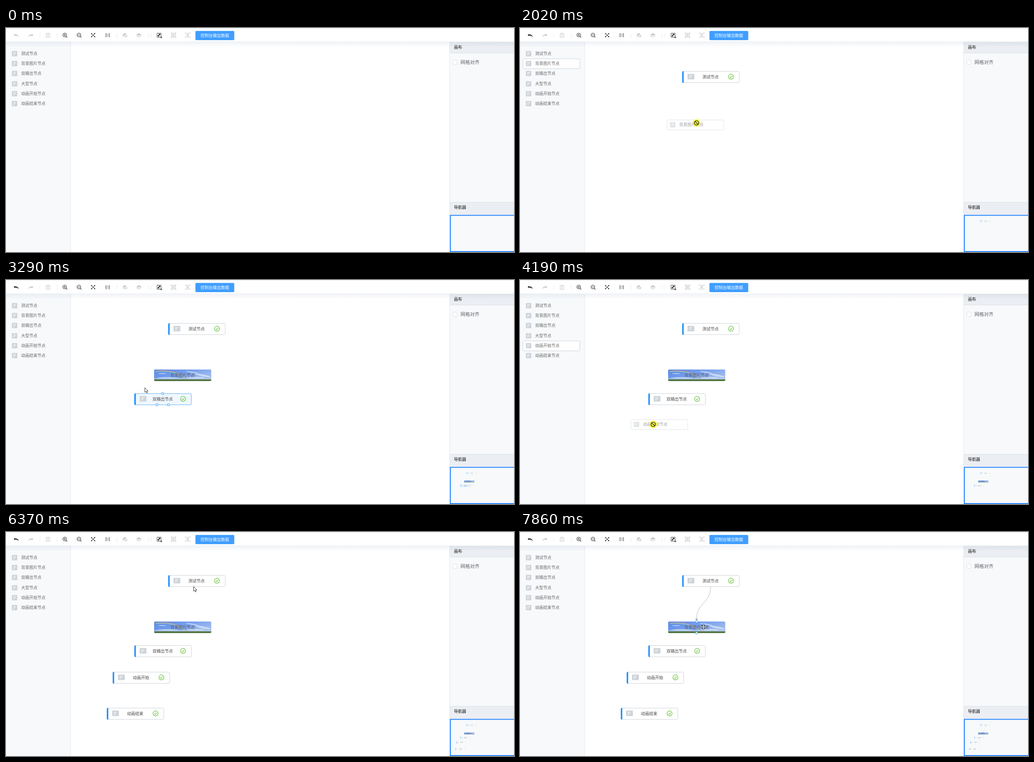
Write an HTML page that moves like this. It is 1125x498 px and loops after 8 s.

```html
<!DOCTYPE html>
<html lang="zh">
<head>
<meta charset="utf-8">
<title>流程图编辑器</title>
<style>
  html, body { margin: 0; width: 100%; height: 100%; overflow: hidden; background: #fff; }
  svg { display: block; }
  text { font-family: "Noto Sans CJK SC", "Noto Sans CJK", "Noto Sans", sans-serif; font-size: 9px; }
  .mid { text-anchor: middle; }
  .line { fill: none; stroke: currentColor; }
  .solid { fill: currentColor; }
  .dark { color: #222; }
  .dim { color: #c6c6c6; }
  .body { fill: #fff; stroke: #ced4d9; }
  .hot .body { fill: #f0f7ff; stroke: #69b4fb; }
  .port { fill: #fff; stroke: #1890ff; display: none; }
  .halo { fill: #1890ff; opacity: .25; display: none; }
  .hot .port, .linking .halo, .linking .in { display: inline; }
  .item .box { fill: none; stroke: none; }
  .item.hot .box { fill: #fff; stroke: #ced4d9; }
</style>
</head>
<body>
<svg id="stage" width="1125" height="498" viewBox="0 0 1125 498">
  <defs>
    <linearGradient id="shade" x2="0" y2="1">
      <stop stop-color="#00346b" stop-opacity=".055"/><stop offset="1" stop-color="#00346b" stop-opacity="0"/>
    </linearGradient>
    <linearGradient id="sky" x2="1" y2=".6">
      <stop stop-color="#5a8ae4"/><stop offset=".5" stop-color="#759fee"/><stop offset="1" stop-color="#a3bdec"/>
    </linearGradient>
    <clipPath id="card"><rect width="126.5" height="25.5" rx="2.5"/></clipPath>
  </defs>
  <g id="panels"></g>
  <g id="tools"></g>
  <g id="items"></g>
  <g id="graph"><path id="edge" fill="none" stroke="#b4bac2"/><path id="tip" d="M388 192.500h6l-3 6z" fill="#a9b0b9"/></g>
  <use href="#graph" transform="translate(954.7 409.7) scale(.182 .18)"/>
  <g id="ghost" opacity=".62"></g>
  <g id="cursor">
    <circle id="press" r="8.500" fill="#ff0" opacity=".7"/>
    <path id="arrow" d="M.5 0v10.200l2.400-2.200 1.700 3.700 1.600-.7-1.700-3.600h3.200z" fill="#fff" stroke="#222" stroke-width=".9"/>
    <g id="ban" fill="none" stroke="#222" stroke-width="1.400"><circle r="4.900"/><path d="M-3.500-3.500 3.500 3.500"/></g>
    <path id="cross" d="M-6 0H6M0-6V6" stroke="#222"/>
    <path id="move" d="M0-6.500 2.700-3.700H1.100V-1.100H3.700V-2.700L6.500 0 3.700 2.700V1.100H1.100V3.700H2.700L0 6.500-2.700 3.700H-1.100V1.100H-3.700V2.700L-6.500 0-3.700-2.700V-1.100H-1.100V-3.700H-2.700z" fill="#fff" stroke="#222" stroke-width=".9"/>
  </g>
</svg>
<script>
const $ = id => document.getElementById(id);
const rect = (x, y, w, h, fill, more = '') =>
  `<rect x="${x}" y="${y}" width="${w}" height="${h}" fill="${fill}" ${more}/>`;
// y is the middle of the line
const label = (x, y, s, fill, more = '', size = 9) =>
  `<text x="${x}" y="${y + size * .37}" fill="${fill}" ${more} style="font-size:${size}px">${s}</text>`;
const add = (id, html) => $(id).insertAdjacentHTML('beforeend', html);

// Panels
add('panels', [
  rect(0, 0, 1125, 1, '#ececec'),
  rect(0, 31, 143, 467, '#f7f9fb'), rect(142.5, 31, 1, 467, '#e4e8ec'),
  rect(982, 31, 143, 467, '#f7f9fb'), rect(982, 31, 1, 467, '#e4e8ec'),
  rect(983, 31, 142, 25, '#ebeef2'), rect(983, 55, 142, 1, '#dce3e8'),
  rect(983, 387, 142, 28, '#ebeef2'), rect(983, 387, 142, 1, '#dce3e8'),
  rect(0, 30, 1125, 1, '#eceff2'), rect(0, 31, 1125, 12, 'url(#shade)'),
  label(992, 42.5, '画布', '#111'), label(992, 398.5, '导航器', '#111'),
  rect(989.5, 71.5, 9.5, 9.5, '#fff', 'stroke="#dcdfe6" rx="1"'),
  label(1006.5, 76, '网格对齐', '#606266', '', 10.5),
  rect(984, 416.5, 143, 80.5, '#f7f9fb', 'stroke="#1a80ff" stroke-width="1.900"')
].join(''));

// Toolbar
const tool = (x, cls, html, id = '') =>
  add('tools', `<g class="${cls}" ${id && `id="${id}"`} transform="translate(${x} 16)">${html}</g>`);
const line = (d, w = 1) => `<path class="line" d="${d}" stroke-width="${w}"/>`;
const solid = d => `<path class="solid" d="${d}"/>`;
const bend = 'M-5.500-.4-2.300-3v1.600C2.300-1.700 5 .2 5.500 4 3.600 1.600 1.500.6-2.300.7v1.600z';
const lens = line('M3.500-.5A4 4 0 1 1-4.500-.5A4 4 0 1 1 3.500-.5M2.300 2.300 5 5', 1.1);
const frame = line('M-4.500-4.500H4.500V4.500H-4.500z', .8);
const corners = solid('M-6-5.500h2v2h-2zM4-5.500h2v2h-2zM-6 3.500h2v2h-2zM4 3.500h2v2h-2z');
const bars = solid('M-3-2.500h6v1.800h-6zM-3 .7h6v1.800h-6z');
const sheets = line('M-5 0 0 2 5 0M-5 2.300 0 4.300 5 2.300', .9);

tool(22.500, 'dim', solid(bend), 'undo');
tool(55, 'dim', `<g transform="scale(-1 1)">${solid(bend)}</g>`);
tool(93, 'dim', line('M-5-3H5M-1.700-3V-4.700H1.700V-3M-4-3V5H4V-3M-1.300-.5V3M1.300-.5V3', .9));
tool(130.500, 'dark', lens + line('M-2.500-.5h4M-.5-2.500v4'));
tool(162, 'dark', lens + line('M-2.500-.5h4'));
tool(193, 'dark', line('M-4.500-4.500-2-2M4.500-4.500 2-2M4.500 4.500 2 2M-4.500 4.500-2 2', 1.1) +
  solid('M-1.300-1.300h2.600v2.600h-2.600zM-4.500-2h2.500v-2.500zM4.500-2h-2.500v-2.500zM4.500 2h-2.500v2.500zM-4.500 2h2.500v2.500z'));
tool(225, 'dark', line('M-3.500-4.500v9M3.500-4.500v9') + solid('M-.6-2.500h1.200v1.400H-.6zM-.6 1.100h1.200v1.400H-.6z'));
tool(263, 'dim', solid('M-5-1.500 0-4.500 4-2.500-1 .5z') + sheets + solid('M2 1h4L4 4z'));
tool(294, 'dim', solid('M-5-1.500 0-4.500 4-2.500-1 .5z') + sheets + solid('M2 0h4L4-3z'));
tool(339, 'dark', frame + solid('M-3 0h3.500v2.500H-3zM-1-3h4v2.500h-4z') + line('M2 4.500h5M4.500 2v5', 1.1));
tool(371, 'dim', frame + corners + bars);
tool(402.500, 'dim', corners + bars + line('M-3-4.500h6M-3 4.500h6', .8));
add('tools', [74.5, 113, 245, 314.5, 321].map(x => rect(x, 11.5, 1, 10, '#e6e9ed')).join('') +
  rect(419.5, 6.5, 86, 20.500, '#409eff', 'rx="2"') + label(462.5, 17, '控制台输出数据', '#fff', 'class="mid"'));

// Side list
const names = ['测试节点', '背景图片节点', '双输出节点', '大型节点', '动画开始节点', '动画结束节点'];
const itemY = i => Math.round(46 + i * 22.2);
const itemArt = i => rect(.5, .5, 126, 22, '#fff', 'class="box" rx="2"') +
  rect(7, 5.300, 12, 11.700, '#ced4d9', 'rx="1"') +
  '<path d="M10 8.800h6.200M10 11.300h4.500M10 13.800h3" stroke="#fff"/>' +
  label(27.5, 10.4, names[i], '#666');
names.forEach((_, i) => add('items', `<g class="item" transform="translate(6 ${itemY(i)})">${itemArt(i)}</g>`));
const items = [...document.querySelectorAll('.item')];

// Graph nodes, given by their centre
const W = 126, H = 25.5;
const photo = `<g clip-path="url(#card)">${rect(0, 0, 127, 26, 'url(#sky)')}
  <g fill="#e9f0fc" opacity=".6"><ellipse cx="108" cy="13" rx="17" ry="2.400" transform="rotate(12 108 13)"/>
  <ellipse cx="92" cy="18" rx="20" ry="1.800"/><ellipse cx="84" cy="6" rx="14" ry="1.300" transform="rotate(10 84 6)"/>
  <ellipse cx="30" cy="18.500" rx="24" ry="1.500"/><ellipse cx="18" cy="9" rx="9" ry="1"/></g>
  ${rect(0, 19.500, 127, 3, '#c3d4f0', 'opacity=".6"')}
  <g fill="none" opacity=".55" stroke-width="1.200"><path d="M3 3Q50-2 73 23" stroke="#e9798c"/>
  <path d="M3 4.200Q49-.8 71.800 23" stroke="#f1e27a"/><path d="M3 5.400Q48 .4 70.600 23" stroke="#7fdc9c"/></g>
  ${rect(0, 22, 127, 4, '#4d6f2f')}</g>`;
const plain = `${rect(.5, .5, W, H - .5, '#fff', 'class="body" rx="2.500"')}
  <path d="M3.500 0v${H + .5}H2.500Q.3 ${H + .5} .3 ${H - 2}V2.500Q.3 0 2.500 0z" fill="#1890ff"/>
  ${rect(12, 6, 15, 12.300, '#ced4d9', 'rx="1"')}
  <path d="M15.500 9.700h7M15.500 12.200h5M15.500 14.700h3.500" stroke="#fff"/>
  <g fill="none" stroke="#67c23a" stroke-width="1.200"><circle cx="108.200" cy="12.300" r="5.600"/><path d="M105.400 12.400l2.100 2.200 3.700-4.200"/></g>`;
const nodes = [
  { name: '测试节点', x: 422, y: 109, born: 8 },
  { name: '背景图片节点', x: 391, y: 211.7, born: 14, art: photo },
  { name: '双输出节点', x: 346.5, y: 265, born: 20, outs: [.4, .6] },
  { name: '动画开始', x: 298.5, y: 323.5, born: 29 },
  { name: '动画结束', x: 286, y: 404, born: 37 }
];
for (const n of nodes) {
  const port = (k, y, cls) => `<circle class="port ${cls}" cx="${W * k}" cy="${y}" r="2.500"/>`;
  add('graph', `<g transform="translate(${Math.round(n.x - W / 2)} ${Math.round(n.y - H / 2)})">${n.art || plain}
    ${label(W / 2, 12.2, n.name, n.art ? '#555' : '#444', 'class="mid"')}
    <circle class="halo" cx="${W / 2}" cy=".5" r="7"/>${port(.5, .5, 'in')}
    ${(n.outs || [.5]).map(k => port(k, H, '')).join('')}</g>`);
  n.el = $('graph').lastElementChild;
}

// Time in ms -> step number; the picture moves in whole steps
const ticks = [[0, 0], [150, 1], [1080, 7], [1230, 8], [2020, 13], [2170, 14], [2330, 15], [3290, 21],
  [3420, 22], [4190, 27], [4380, 28], [4510, 29], [5440, 35], [5590, 36], [6370, 41], [6510, 42],
  [6630, 43], [6780, 44], [7710, 50], [7860, 51], [8000, 52]];
// Pointer way points: step, x, y
const way = [[1, 900, 381], [4, 66, 59], [5, 62, 57], [7, 395, 106], [8, 422, 109], [10, 78, 80],
  [11, 72, 75], [13, 391, 211], [14, 391, 212], [17, 62, 102], [18, 58, 100], [20, 347, 265],
  [21, 307, 239.5], [23, 82, 120], [24, 60, 147], [25, 56, 146], [27, 295, 321], [28, 298, 323],
  [29, 299, 324], [32, 54, 172], [33, 52, 173], [35, 264, 357], [37, 286, 404], [38, 286, 404],
  [41, 415, 121.5], [42, 420, 112], [43, 422, 122], [44, 422, 122], [48, 400, 196], [49, 406, 211], [52, 406, 211]];
const drags = [[0, 5, 8], [1, 11, 14], [2, 18, 20], [4, 25, 29], [5, 33, 37]]; // item, press, drop

function lerp(list, v) {
  const i = Math.max(1, list.findIndex(p => p[0] >= v));
  const a = list[i - 1], b = list[i], k = (v - a[0]) / (b[0] - a[0]);
  return a.slice(1).map((n, j) => n + (b[j + 1] - n) * k);
}
const show = (el, on) => { el.style.display = on ? 'inline' : 'none'; };
const curve = (x, y) => {
  const m = (y - 122) * .52;
  return `M422 122C422 ${122 + m} ${x} ${y - m} ${x} ${y}`;
};

let last = -1;
function draw(step) {
  const [x, y] = lerp(way, Math.max(step, 1));
  const drag = drags.find(d => step >= d[1] && step < d[2]);
  const linking = step >= 44 && step < 50;
  const onPort = step >= 43 && step < 50;

  let overItem = -1;
  if (step && !drag && x > 6 && x < 133) overItem = Math.floor((y - itemY(0)) / 22.2);
  const hotItem = drag ? drag[0] : overItem;
  items.forEach((el, i) => el.classList.toggle('hot', i === hotItem));

  let overNode = false;
  nodes.forEach((n, i) => {
    const over = step >= n.born && !drag && Math.abs(x - n.x) < W / 2 && Math.abs(y - n.y) < 12.5;
    overNode = overNode || over;
    const fresh = step >= n.born && step < n.born + 2;
    show(n.el, step >= n.born);
    n.el.classList.toggle('hot', over || fresh || (i === 0 && onPort));
  });
  $('graph').classList.toggle('linking', linking);

  const linked = step >= 50;
  show($('edge'), linking || linked);
  show($('tip'), linked);
  $('edge').setAttribute('d', linked ? curve(391, 194) : curve(x, y));

  show($('ghost'), drag);
  if (drag) {
    const [gx, gy] = lerp(way, drag[1]);
    $('ghost').innerHTML = `<g class="item hot">${itemArt(drag[0])}</g>`;
    $('ghost').setAttribute('transform',
      `translate(${Math.round(6 + x - gx)} ${Math.round(itemY(drag[0]) + y - gy)})`);
  }

  const shape = drag ? 'ban' : onPort ? 'cross' : overNode || items[overItem] ? 'move' : 'arrow';
  for (const id of ['ban', 'cross', 'move', 'arrow']) show($(id), id === shape);
  show($('press'), drag || linking || step === 50);
  show($('cursor'), step > 0);
  $('cursor').setAttribute('transform', `translate(${x} ${y})`);

  $('undo').setAttribute('class', step >= 8 ? 'dark' : 'dim');
}

function tick(now) {
  const step = Math.floor(lerp(ticks, now % 8000)[0] + 1e-6);
  if (step !== last) draw(last = step);
  requestAnimationFrame(tick);
}
draw(0);
requestAnimationFrame(tick);
</script>
</body>
</html>
```
